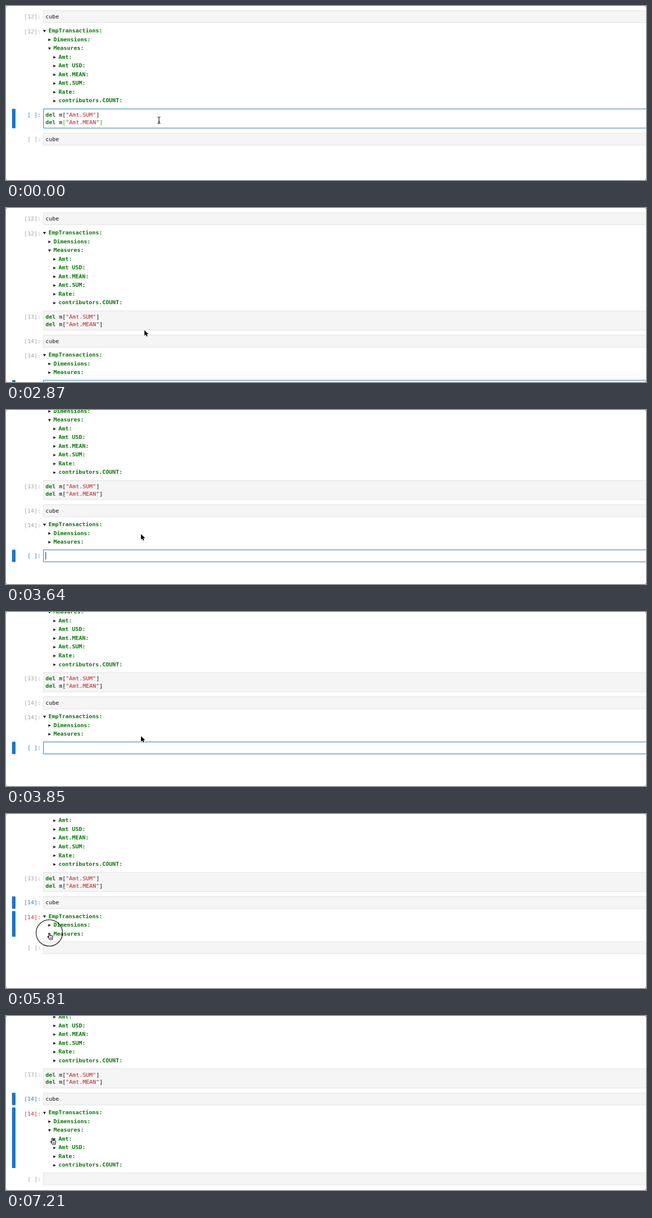
An HTML page with a canvas for the animation above (7.56 s loop, 1280 by 349 pixels).

```html
<!DOCTYPE html>
<html lang="en">
<head>
<meta charset="utf-8">
<title>Notebook</title>
<style>
  html, body { margin: 0; width: 100%; height: 100%; overflow: hidden; background: #fff; }
  canvas { display: block; width: 1280px; height: 349px; }
</style>
</head>
<body>
<canvas id="stage" width="1280" height="349"></canvas>
<script>
const ctx = document.getElementById('stage').getContext('2d');
const LOOP = 7560, STEP = 70;
const FONT = '11.2px "DejaVu Sans Mono", "Liberation Mono", monospace';
const CHAR = 6.742, ROW = 17.53, LINE = 14.7;
const BLUE = '#1976d2', ACTIVE = '#307fc1', GREY = '#a3a3a3', RED = '#b5393a';
const GREEN = '#007a00', STRING = '#ba2121', MATCH = '#0b0';

// When things happen, in ms
const RUN_DEL = 350, RUN_CUBE = 2100, PRESS = 5740, FOCUS = 5810, OPEN = 5950;

const SCROLL = [[3220, 0], [3290, 4], [3360, 13], [3430, 27], [3500, 40.9], [3570, 54], [3640, 65],
  [3710, 73.5], [3780, 80], [3850, 84.9], [3920, 88], [3990, 89.4],
  [6720, 89.4], [6790, 93], [6860, 98], [6930, 100.7]];

const HAND_PATH = [[4130, 270, 249], [4200, 266, 249], [4340, 228, 247], [4480, 178, 243], [4620, 136, 239],
  [4760, 108, 235.5], [4900, 96, 234], [4970, 95, 234], [5320, 90, 237], [5390, 90, 237],
  [5600, 86.5, 239], [6720, 86.5, 239], [6930, 92.5, 245]];

const arrow = new Path2D('M0 0V11.2L2.6 8.8 4.4 12.8 6.3 12 4.6 8.1H8.2Z');
const hand = new Path2D('M3 8.3V1.5C3 .3 4.9 .3 5 1.5L5.3 5.2C5.6 4.4 7.2 4.5 7.3 5.6' +
  'C7.8 4.9 9.2 5.1 9.3 6.1C10 5.6 11.3 6 11.2 7.2C11.3 9.5 10.2 10.5 9.8 13.5' +
  'H4.6C4.3 11.8 2.4 10.5 1 8.3C.3 7.2 1.5 6.3 3 8.3Z');
const fingers = new Path2D('M5.6 8.6V11.4M7.2 8.6V11.4M8.8 8.6V11.4');

// Interpolates every column after the time
function at(keys, t) {
  if (t <= keys[0][0]) return keys[0].slice(1);
  for (let i = 1; i < keys.length; i++) {
    const a = keys[i - 1], b = keys[i];
    if (t <= b[0]) {
      const k = (t - a[0]) / (b[0] - a[0]);
      return a.slice(1).map((v, j) => v + (b[j + 1] - v) * k);
    }
  }
  return keys[keys.length - 1].slice(1);
}

function text(str, x, y, color, bold) {
  ctx.font = (bold ? 'bold ' : '') + FONT;
  ctx.fillStyle = color;
  ctx.fillText(str, x, y);
  return x + str.length * CHAR;
}

function prompt(label, y, color) {
  text(`[${label}]:`, 69.8 - (String(label).length + 3) * CHAR, y, color);
}

function bar(y, h) {
  ctx.fillStyle = BLUE;
  ctx.beginPath();
  ctx.roundRect(12, y, 7, h, 1);
  ctx.fill();
}

// state: 'idle', 'selected' or 'edit'
function cell(y, h, label, state) {
  const edit = state === 'edit', on = state !== 'idle';
  ctx.fillStyle = edit ? '#fff' : '#f5f5f5';
  ctx.fillRect(75, y, 1210, h);
  ctx.strokeStyle = edit ? ACTIVE : '#e0e0e0';
  ctx.lineWidth = edit ? 1.2 : 1;
  ctx.strokeRect(75, y + .3, 1210, h - .6);
  if (on) bar(y, h);
  prompt(label, y + 15.9, on ? ACTIVE : GREY);
}

function triangle(x, y, open) {
  ctx.fillStyle = '#111';
  ctx.beginPath();
  if (open) {
    ctx.moveTo(x - 2.8, y - 2.2); ctx.lineTo(x + 2.8, y - 2.2); ctx.lineTo(x, y + 2.8);
  } else {
    ctx.moveTo(x - 2.3, y - 2.6); ctx.lineTo(x + 2.8, y); ctx.lineTo(x - 2.3, y + 2.6);
  }
  ctx.fill();
}

function tree(y, measures, label, active) {
  const rows = [[0, 'EmpTransactions', true], [1, 'Dimensions', false], [1, 'Measures', !!measures]]
    .concat((measures || []).map(name => [2, name, false]));
  if (active) bar(y - 9.8, rows.length * ROW - 1.2);
  prompt(label, y + 6.2, active ? RED : GREY);
  rows.forEach(([depth, name, open], i) => {
    const ry = y + i * ROW;
    triangle(77 + depth * 10, ry + 1.1, open);
    text(name + ':', 85 + depth * 10, ry + 4, GREEN, true);
  });
}

function delLine(name, y, bracket) {
  let x = text('del', 79, y, GREEN, true);
  x = text('m', x + CHAR, y, '#111');
  x = text('[', x, y, bracket);
  x = text(`"${name}"`, x, y, STRING);
  text(']', x, y, bracket);
}

function drawPage(t) {
  const ran = t >= RUN_DEL, shown = t >= RUN_CUBE, picked = t >= FOCUS, open = t >= OPEN;

  cell(9.2, 24.6, 12, 'idle');
  text('cube', 79, 25.1, '#111');
  tree(49.2, ['Amt', 'Amt USD', 'Amt.MEAN', 'Amt.SUM', 'Rate', 'contributors.COUNT'], 12, false);

  cell(206.2, 39, ran ? 13 : ' ', ran ? 'idle' : 'edit');
  delLine('Amt.SUM', 222.2, '#111');
  delLine('Amt.MEAN', 222.2 + LINE, ran ? '#111' : MATCH);

  cell(254.6, 24.8, shown ? 14 : ' ', picked || (ran && !shown) ? 'selected' : 'idle');
  text('cube', 79, 270.7, '#111');

  if (!shown) return;
  tree(294, open && ['Amt', 'Amt USD', 'Rate', 'contributors.COUNT'], 14, picked);
  const y = 345.2 + (open ? 4 * ROW : 0);
  cell(y, 24.6, ' ', picked ? 'idle' : 'edit');
  if (!picked && (t - RUN_CUBE) % 1060 < 530) {
    ctx.fillStyle = '#000';
    ctx.fillRect(79, y + 4.5, 1, 15);
  }
}

function drawIbeam(x, y) {
  ctx.beginPath();
  ctx.moveTo(x - 3, y - 6.5);
  ctx.quadraticCurveTo(x, y - 6.5, x, y - 4.5);
  ctx.lineTo(x, y + 4.5);
  ctx.quadraticCurveTo(x, y + 6.5, x - 3, y + 6.5);
  ctx.moveTo(x + 3, y - 6.5);
  ctx.quadraticCurveTo(x, y - 6.5, x, y - 4.5);
  ctx.moveTo(x, y + 4.5);
  ctx.quadraticCurveTo(x, y + 6.5, x + 3, y + 6.5);
  ctx.moveTo(x - 1.7, y + 2.5);
  ctx.lineTo(x + 1.7, y + 2.5);
  ctx.strokeStyle = '#fff';
  ctx.lineWidth = 2.6;
  ctx.stroke();
  ctx.strokeStyle = '#111';
  ctx.lineWidth = 1.2;
  ctx.stroke();
}

function drawArrow(x, y) {
  ctx.save();
  ctx.translate(x, y);
  ctx.strokeStyle = '#fff';
  ctx.lineWidth = 1.6;
  ctx.stroke(arrow);
  ctx.fillStyle = '#000';
  ctx.fill(arrow);
  ctx.restore();
}

function drawHand(x, y) {
  ctx.save();
  ctx.translate(x - 4, y - .5);
  ctx.fillStyle = '#fff';
  ctx.fill(hand);
  ctx.strokeStyle = '#111';
  ctx.lineWidth = 1.1;
  ctx.stroke(hand);
  ctx.lineWidth = .8;
  ctx.stroke(fingers);
  ctx.restore();
}

function drawPointer(t) {
  if (t < RUN_DEL) return drawIbeam(306, 229);
  if (t < 2660) return;
  if (t < 4200) {
    const [x, y] = at([[2590, 304, 229], [2940, 270, 249]], t);
    return y < 245 ? drawIbeam(x, y) : drawArrow(x, y);
  }
  const [x, y] = at(HAND_PATH, t);
  if (t < 4410) drawArrow(x, y);
  else drawHand(x, y);
  if (t >= PRESS && t < 6090) {
    ctx.globalAlpha = Math.min(1, (6090 - t) / 140);
    ctx.strokeStyle = '#111';
    ctx.lineWidth = 1.3;
    ctx.beginPath();
    ctx.arc(86.6, 238.5, 26.4, 0, Math.PI * 2);
    ctx.stroke();
    ctx.globalAlpha = 1;
  }
}

function drawCorners() {
  ctx.fillStyle = '#666';
  for (const x of [0, 1280]) for (const y of [0, 349]) {
    ctx.beginPath();
    ctx.moveTo(x, y);
    ctx.lineTo(x ? x - 2 : 2, y);
    ctx.lineTo(x, y ? y - 2 : 2);
    ctx.fill();
  }
}

function render(t) {
  ctx.fillStyle = '#fff';
  ctx.fillRect(0, 0, 1280, 349);
  ctx.save();
  ctx.translate(0, -at(SCROLL, t)[0]);
  drawPage(t);
  ctx.restore();
  drawPointer(t);
  drawCorners();
}

const start = performance.now();
function tick() {
  const t = (performance.now() - start) % LOOP;
  render(Math.floor(t / STEP) * STEP);
  requestAnimationFrame(tick);
}
tick();
</script>
</body>
</html>
```
